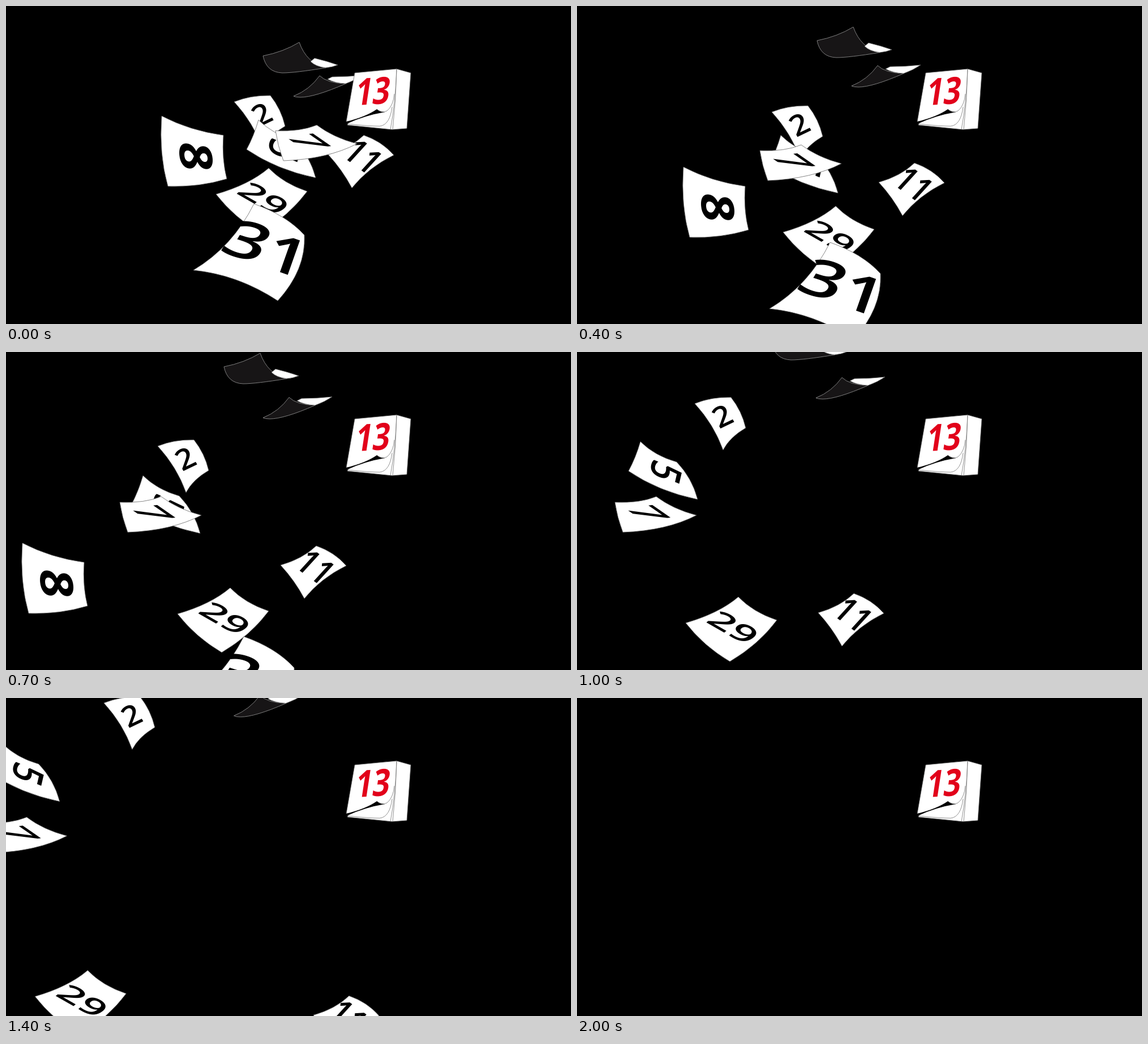
Recreate the animation shown at these times as an HTML page. Size 998 px wide and 561 px high, loop 2100 ms.

```html
<!DOCTYPE html>
<html lang="en">
<head>
<meta charset="utf-8">
<title>Flying calendar pages</title>
<style>
  html, body { margin: 0; width: 100%; height: 100%; overflow: hidden; background: #000; }
  svg { display: block; width: 100%; height: 100%; }
  .page { fill: #fff; stroke: #666; stroke-width: .8; stroke-linejoin: round; }
  .back { fill: #171516; stroke: #8c8c8c; stroke-width: .9; stroke-linejoin: round; }
  .fold { fill: none; stroke: #777; stroke-width: .8; }
  text { font: 600 100px "Open Sans", "Noto Sans", sans-serif; text-anchor: middle; }
  .bold { font-weight: 700; }
  .red { fill: #e2001a; }
</style>
</head>
<body>
<svg id="stage" viewBox="0 0 998 561">
  <g id="pages"></g>
  <g id="block">
    <path class="page" d="M616 118 L690 111 L715 118 L708 216 L682 218 L603 210 L605 204 L601 204 Z"/>
    <path d="M601 204 Q637 195 655 182 Q661 187 670 187 Q634 193 604 207 Z"/>
    <path class="fold" d="M655 182 Q664 190 673 185 Q684 176 686 155 M604 208 Q640 212 660 212 Q678 210 682 178"/>
    <path class="fold" d="M690 111 Q688 170 679 218 M690 112 Q689 165 683 218"/>
    <text class="bold red" y="35.7" transform="matrix(.53 -.03 -.1 .66 648.5 150)">13</text>
  </g>
</svg>
<script>
const LOOP = 2100, STEP = 100;
const NS = "http://www.w3.org/2000/svg";

// d: outline, cls: fill style; labels: [text, matrix, class]; keys: [ms, dx, dy]
const sheets = [
  {
    shapes: [
      ["back", "M454 88 Q490 81 518 64 Q531 101 565 109 Q510 118 488 118 Q460 117 454 88 Z"],
      ["page", "M545 92 Q566 97 586 104 Q576 108 565 109 Q547 107 538 98 Z"]
    ],
    keys: [[0, 0, 0], [400, -30, -27], [700, -69, -62], [1000, -110, -104], [1200, -113, -112], [1600, -105, -150]]
  },
  {
    shapes: [
      ["back", "M508 159 Q536 148 554 123 Q567 136 600 137 Q545 161 520 161 Q511 161 508 159 Z"],
      ["page", "M568 129 L576 125 Q603 125 630 122 Q617 131 600 137 Q580 136 568 129 Z"]
    ],
    keys: [[0, 0, 0], [400, -23, -18], [700, -54, -43], [1000, -86, -78], [1200, -98, -100], [1600, -110, -159]]
  },
  {
    shapes: [["page", "M275 194 Q325 220 384 228 Q381 270 390 305 Q340 320 286 318 Q270 262 275 194 Z"]],
    labels: [["8", ".08 .88 -.8 -.08 335.5 266", "bold"]],
    keys: [[0, 0, 0], [400, -87, 90], [600, -195, 130], [700, -246, 143], [1000, -430, 165]]
  },
  {
    shapes: [["page", "M403 169 Q433 157 467 158 Q486 182 493 212 Q465 228 453 251 Q437 206 403 169 Z"]],
    labels: [["2", ".5 -.24 .25 .45 451.5 191"]],
    keys: [[0, 0, 0], [400, -59, 18], [700, -135, -3], [1000, -195, -78], [1200, -218, -114], [1600, -235, -213]]
  },
  {
    shapes: [["page", "M446 201 Q471 226 510 237 Q537 265 547 303 Q478 289 425 253 Q438 229 446 201 Z"]],
    labels: [["5", "-.12 .52 -.72 -.3 491 255"]],
    keys: [[0, 0, 0], [400, -86, 27], [700, -204, 17], [1000, -334, -43], [1200, -392, -75], [1600, -514, -175]]
  },
  {
    shapes: [["page", "M632 228 Q664 239 685 263 Q640 285 611 321 Q594 289 569 262 Q608 251 632 228 Z"]],
    labels: [["11", ".44 .32 -.42 .46 631 265"]],
    keys: [[0, 0, 0], [400, -36, 49], [700, -84, 114], [1000, -143, 198], [1200, -106, 259], [1600, 63, 320], [1700, 97, 328], [1800, 130, 340]]
  },
  {
    shapes: [["page", "M476 220 Q520 222 549 210 Q578 232 620 243 Q568 270 490 273 Q480 247 476 220 Z"]],
    labels: [["7", ".65 .45 -.68 .08 534 239"]],
    keys: [[0, 0, 0], [400, -153, 35], [700, -275, 45], [1000, -409, 45], [1200, -459, 29], [1600, -568, -37]]
  },
  {
    shapes: [["page", "M464 286 Q490 313 532 327 Q500 370 449 400 Q403 373 371 332 Q430 315 464 286 Z"]],
    labels: [["29", ".65 .37 -.37 .31 455 339.5"]],
    keys: [[0, 0, 0], [400, -7, 67], [700, -68, 130], [1000, -179, 146], [1200, -246, 165], [1600, -398, 231]]
  },
  {
    shapes: [["page", "M438 349 Q495 369 527 404 Q530 465 480 520 Q410 474 331 466 Q400 425 438 349 Z"]],
    labels: [["3", "1.25 .4 -.5 .82 427 414"], ["1", "1.2 .42 -.3 .85 497 440"]],
    keys: [[0, 0, 0], [400, 9, 68], [700, -18, 153], [1000, -85, 243]]
  }
];

function add(parent, tag, attrs) {
  const el = document.createElementNS(NS, tag);
  for (const name in attrs) el.setAttribute(name, attrs[name]);
  return parent.appendChild(el);
}

function build(sheet) {
  const g = add(document.getElementById("pages"), "g", {});
  for (const [cls, d] of sheet.shapes) add(g, "path", { class: cls, d });
  for (const [str, m, cls = ""] of sheet.labels || []) {
    add(g, "text", { class: cls, y: 35.7, transform: `matrix(${m})` }).textContent = str;
  }
  sheet.el = g;
}

// Smooth curve through the keys of one axis; runs on in a straight line after the last key.
function track(keys, axis) {
  const n = keys.length - 1;
  const span = i => keys[i + 1][0] - keys[i][0];
  const speed = i => (keys[i + 1][axis] - keys[i][axis]) / span(i);
  const inner = i => (speed(i - 1) * span(i) + speed(i) * span(i - 1)) / (span(i - 1) + span(i));
  const slope = i =>
    i === 0 ? 1.5 * speed(0) - .5 * inner(1) :
    i === n ? 1.5 * speed(n - 1) - .5 * inner(n - 1) : inner(i);
  return t => {
    if (t >= keys[n][0]) return keys[n][axis] + speed(n - 1) * (t - keys[n][0]);
    let i = 0;
    while (t >= keys[i + 1][0]) i++;
    const h = span(i), s = (t - keys[i][0]) / h, r = 1 - s;
    return keys[i][axis] * r * r * (1 + 2 * s) + keys[i + 1][axis] * s * s * (3 - 2 * s)
      + h * s * r * (slope(i) * r - slope(i + 1) * s);
  };
}

for (const sheet of sheets) {
  build(sheet);
  sheet.x = track(sheet.keys, 1);
  sheet.y = track(sheet.keys, 2);
}

function draw(ms) {
  const t = Math.floor((ms % LOOP) / STEP) * STEP;
  for (const { el, x, y } of sheets) {
    el.setAttribute("transform", `translate(${x(t).toFixed(2)} ${y(t).toFixed(2)})`);
  }
}

const start = performance.now();
function tick() {
  draw(performance.now() - start);
  requestAnimationFrame(tick);
}
tick();
</script>
</body>
</html>
```
